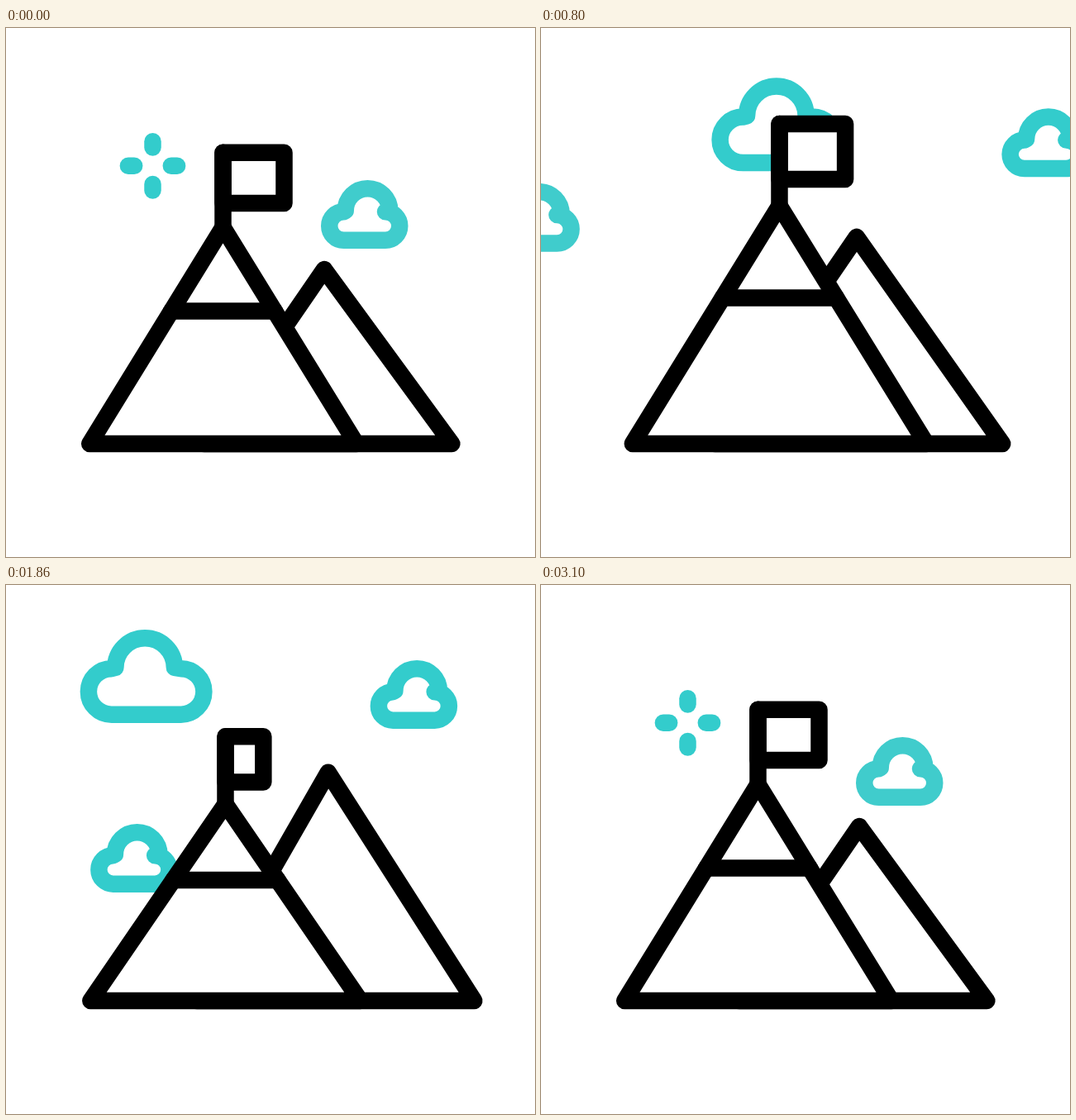
These frames come from a looping animation (640x640 px, 3400 ms). An HTML page with a canvas:

```html
<!DOCTYPE html>
<html lang="en">
<head>
<meta charset="utf-8">
<title>Mountain flag</title>
<style>
  html, body { margin: 0; width: 100%; height: 100%; overflow: hidden; background: #fff; }
  canvas { display: block; width: 640px; height: 640px; }
</style>
</head>
<body>
<canvas id="stage" width="640" height="640"></canvas>
<script>
const ctx = document.getElementById('stage').getContext('2d');
const LOOP = 3400, STEP = 20, FIRST = 220, LAST = 3100;
const TEAL = '#33cccc', SOFT_TEAL = '#40cccc';
const LINE = 20.5, GROUND = 503;

const mix = (a, b, u) => a + (b - a) * u;

// Eased progress from 0 to 1, starting at a time and lasting a while.
function ease(t, start, length) {
  const u = Math.min(1, Math.max(0, (t - start) / length));
  return u * u * (3 - 2 * u);
}

// Each mountain goes from rest to leaning, to squat, and back to rest.
const POSE_STARTS = [130, 1160, 2000];
const MAIN = { length: 870, poses: [
  { x: 262.5, y: 241, half: 161.3, flag: 74 },
  { x: 292.5, y: 211, half: 180.2, flag: 80.5 },
  { x: 262.5, y: 271, half: 161.3, flag: 42 }
] };
const SIDE = { length: 950, poses: [
  { x: 385, y: 292, left: 240, right: 539.4 },
  { x: 381, y: 242.5, left: 203, right: 563.2 },
  { x: 391.5, y: 223.5, left: 237, right: 567 }
] };

function poseAt({ poses, length }, t) {
  const p = POSE_STARTS.reduce((sum, start) => sum + ease(t, start, length), 0);
  const i = Math.floor(p), from = poses[i % 3], to = poses[(i + 1) % 3];
  return Object.fromEntries(
    Object.keys(from).map(key => [key, mix(from[key], to[key], p - i)]));
}

// The clouds sweep left, drift back slowly, then rush out to the right.
function cloudX(t) {
  if (t < 1200) return mix(646, 35, ease(t, 54, 1146));
  const u = (t - 1200) / (LAST - 1200);
  return 35 + 155 * u + 456 * u ** 6;
}

const BOB = [[200, 56.5], [360, 24], [1140, 85], [1790, 52.5], [2520, 107], [3100, 56.5]];

function cloudY(t) {
  return BOB.slice(1).reduce((y, [time, level], i) => {
    const [before, last] = BOB[i];
    return y + (level - last) * ease(t, before, time - before);
  }, BOB[0][1]);
}

// Two round lobes on a flat base, with a dome on top.
function cloud(lobe, dome, domeX, right, base) {
  const path = new Path2D(), up = -Math.PI / 2, down = Math.PI / 2;
  path.arc(right, base - lobe, lobe, down, up, true);
  path.arc(domeX, LINE / 2 + dome, dome, 0, Math.PI, true);
  path.arc(LINE / 2 + lobe, base - lobe, lobe, up, down, true);
  path.closePath();
  return path;
}

const SMALL = cloud(17.25, 26.75, 56.5, 78, 72.75);
const BIG = cloud(27.75, 35.75, 78.5, 122, 102.75);

function drawCloud(path, x, y, color = TEAL) {
  ctx.save();
  ctx.translate(x, y);
  ctx.strokeStyle = color;
  ctx.stroke(path);
  ctx.restore();
}

function drawClouds(t) {
  const x = cloudX(t), y = cloudY(t);
  drawCloud(SMALL, x - 265, y + 127.5, SOFT_TEAL);
  drawCloud(BIG, x, y);
  drawCloud(SMALL, x + 12.5, y + 235);
  drawCloud(SMALL, x + 351, y + 37);
}

function shape(points, closed) {
  ctx.beginPath();
  points.forEach(([x, y]) => ctx.lineTo(x, y));
  if (closed) {
    ctx.closePath();
    ctx.fill();
  }
  ctx.stroke();
}

function drawSpark(t) {
  const size = 1 - ease(t, 200, 170) + ease(t, 2080, 260);
  if (size <= 0) return;
  ctx.strokeStyle = TEAL;
  const far = 29.6, near = far - 7.3 * size;
  for (const [dx, dy] of [[1, 0], [0, 1], [-1, 0], [0, -1]]) {
    shape([far, near].map(r => [177.5 + dx * r, 166.8 + dy * r]));
  }
}

function drawSide(t) {
  const { x, y, left, right } = poseAt(SIDE, t);
  shape([[left, GROUND], [x, y], [right, GROUND]], true);
}

function drawMain(t) {
  const { x, y, half, flag } = poseAt(MAIN, t);
  const height = GROUND - y, snow = 0.387;
  shape([[x - half, GROUND], [x, y], [x + half, GROUND]], true);
  shape([-1, 1].map(side => [x + side * half * snow, y + height * snow]));

  const top = y - height * 0.344, bottom = top + height * 0.233;
  shape([[x, top], [x + flag, top], [x + flag, bottom], [x, bottom]], true);
  shape([[x, top], [x, y]]);
}

function draw(t) {
  ctx.fillStyle = '#fff';
  ctx.fillRect(0, 0, 640, 640);
  ctx.lineWidth = LINE;
  ctx.lineCap = ctx.lineJoin = 'round';
  drawClouds(t);
  drawSpark(t);
  ctx.strokeStyle = '#000';
  drawSide(t);
  drawMain(t);
}

const start = performance.now();
function tick() {
  const t = Math.floor(Math.max(0, performance.now() - start) % LOOP / STEP) * STEP;
  draw(t < FIRST ? 0 : Math.min(t, LAST));
  requestAnimationFrame(tick);
}
tick();
</script>
</body>
</html>
```
